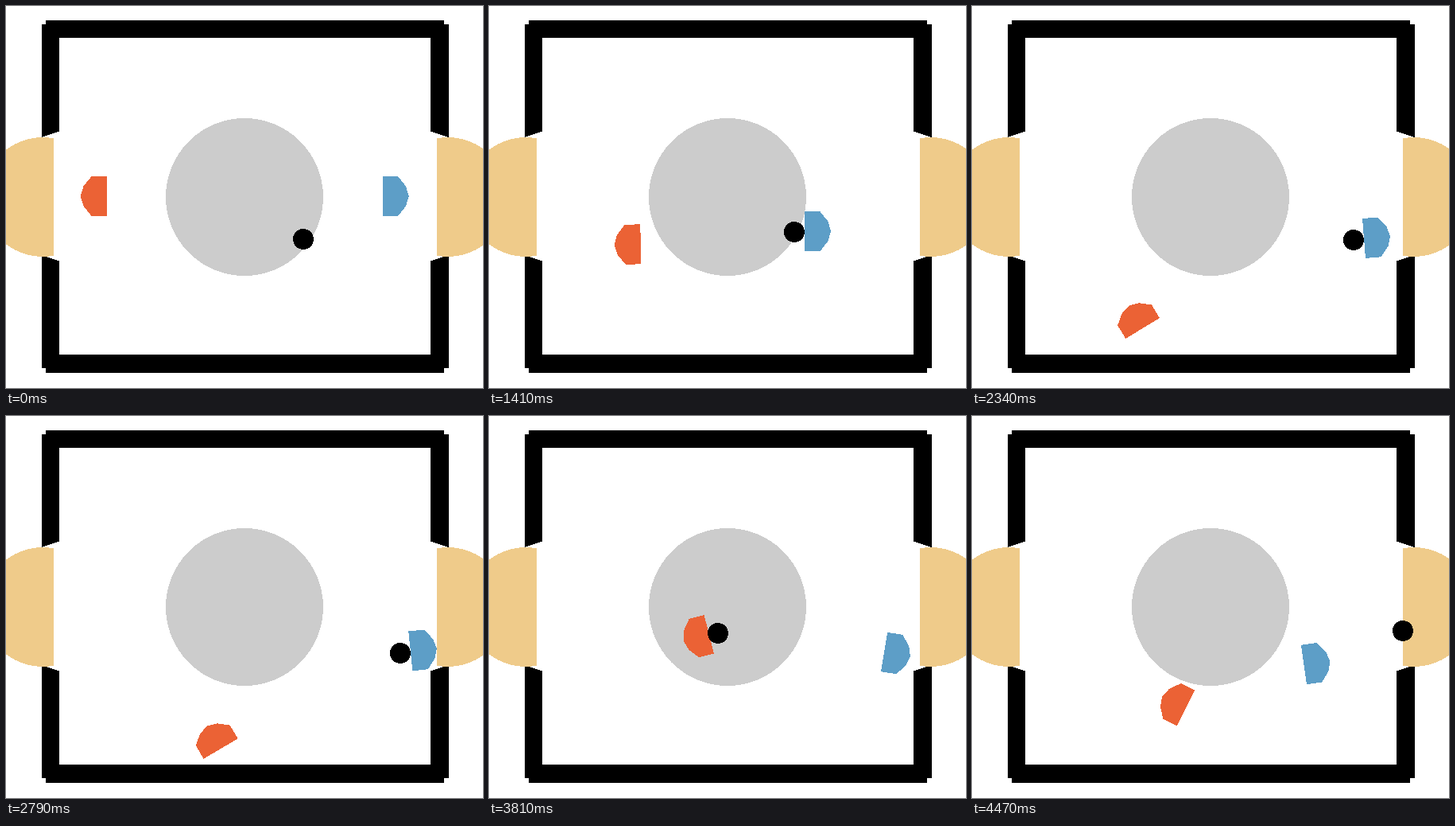
These frames come from a looping animation (600 by 480 pixels, 4500 ms). An HTML page:

```html
<!DOCTYPE html>
<html lang="en">
<head>
<meta charset="utf-8">
<title>Table hockey</title>
<style>
  html, body { margin: 0; width: 100%; height: 100%; overflow: hidden; background: #fff; }
  svg { display: block; width: 600px; height: 480px; shape-rendering: crispEdges; }
  .racket { stroke: currentColor; fill: currentColor; stroke-width: 2; }
  #red { color: #eb6235; }
  #blue { color: #5d9ec7; }
</style>
</head>
<body>
<svg viewBox="0 0 600 480">
  <defs>
    <path id="racket" class="racket" d="M-12 24H6V-24H-12L-21.6 -12L-25.2 0L-21.6 12Z"/>
    <path id="goal" fill="#efcb8a" d="M60 166.3A75 75 0 1 0 60 313.7Z"/>
  </defs>
  <path d="M50 18H551V23H557V165L534 157.5V40H67V157.5L45 165V23H50Z"/>
  <path d="M50 461H551V455H557V313L534 320.5V438H67V320.5L45 313V455H50Z"/>
  <use href="#goal"/>
  <use href="#goal" transform="translate(602) scale(-1 1)"/>
  <circle cx="300" cy="240" r="99" fill="#ccc"/>
  <g id="red"><use href="#racket"/></g>
  <g id="blue"><use href="#racket" transform="scale(-1 1)"/></g>
  <circle id="puck" r="13"/>
</svg>
<script>
const LOOP = 4500, STEP = 30;
const $ = id => document.getElementById(id);

// Turning points: time, x, y, angle in degrees; grip is where the puck sits
const red = {
  el: $('red'), grip: [18, 1.3],
  path: [
    [0, 120, 239, 0], [840, 138, 298.6, -9.3], [1620, 193, 300, 4],
    [1920, 194, 362.6, 20.3], [2340, 211, 399, 58.8], [2700, 266, 418, 60],
    [3240, 267.8, 316.3, 48.3], [3630, 244, 280, 2], [3810, 270, 276, -14.3],
    [4260, 245, 401, 19], [4470, 262.7, 364, 26.6]
  ]
};
const blue = {
  el: $('blue'), grip: [-20, 1],
  path: [
    [0, 480.5, 239, 0], [540, 504, 259, -5], [840, 443.7, 272.5, -16.6],
    [1080, 394, 290, -8], [1920, 441.5, 269.7, 5.7], [2340, 500, 291.4, -4.6],
    [2520, 518, 291, -5], [3240, 509, 302.6, -7], [3810, 504, 297.6, 9.3],
    [4200, 460, 334, 0], [4470, 424.4, 311.5, -8.1]
  ]
};

// Spans in which a racket carries the puck
const holds = [[1080, 1470, blue], [1770, 1830, red], [2340, 3180, blue], [3600, 3960, red]];

const mix = (a, b, u) => a + (b - a) * u;

// Smooth curve through the turning points without overshoot
function poseAt({ path }, t) {
  const next = path.findIndex(p => p[0] > t);
  const i = (next < 1 ? path.length - 1 : next) - 1;
  const a = path[i], b = path[i + 1], span = b[0] - a[0], u = (t - a[0]) / span;
  const slope = (k, c) => {
    const p = path[k], q = path[k + 1];
    return p && q ? (q[c] - p[c]) / (q[0] - p[0]) : 0;
  };
  const tangent = (k, c) => {
    const p = slope(k - 1, c), q = slope(k, c);
    return p * q > 0 ? 2 * p * q / (p + q) : 0;
  };
  return [1, 2, 3].map(c =>
    mix(a[c], b[c], u * u * (3 - 2 * u)) +
    span * u * (1 - u) * ((1 - u) * tangent(i, c) - u * tangent(i + 1, c)));
}

function carried(racket, t) {
  const [x, y, deg] = poseAt(racket, t), [gx, gy] = racket.grip;
  const c = Math.cos(deg * Math.PI / 180), s = Math.sin(deg * Math.PI / 180);
  return [x + gx * c - gy * s, y + gx * s + gy * c];
}

// The puck rests, bounces once off the bottom wall and ends in the right goal
const flight = [
  [0, 374, 293], [1079, 374, 293], [1920, 260, 394],
  [1980, 292, 424], [3240, 468, 314], [4470, 542, 270],
  ...holds.flatMap(([from, to, r]) => [from, to].map(t => [t, ...carried(r, t)]))
].sort((a, b) => a[0] - b[0]);

function puckAt(t) {
  const hold = holds.find(([from, to]) => t >= from && t <= to);
  if (hold) return carried(hold[2], t);
  const i = Math.max(1, flight.findIndex(p => p[0] >= t));
  const a = flight[i - 1], b = flight[i], u = (t - a[0]) / (b[0] - a[0]);
  return [mix(a[1], b[1], u), mix(a[2], b[2], u)];
}

function place(el, [x, y, deg = 0]) {
  el.setAttribute('transform', `translate(${x} ${y}) rotate(${deg})`);
}

const start = performance.now();
function tick() {
  const t = Math.floor((performance.now() - start) % LOOP / STEP) * STEP;
  for (const racket of [red, blue]) place(racket.el, poseAt(racket, t));
  place($('puck'), puckAt(t).map(Math.round));
  requestAnimationFrame(tick);
}
tick();
</script>
</body>
</html>
```
